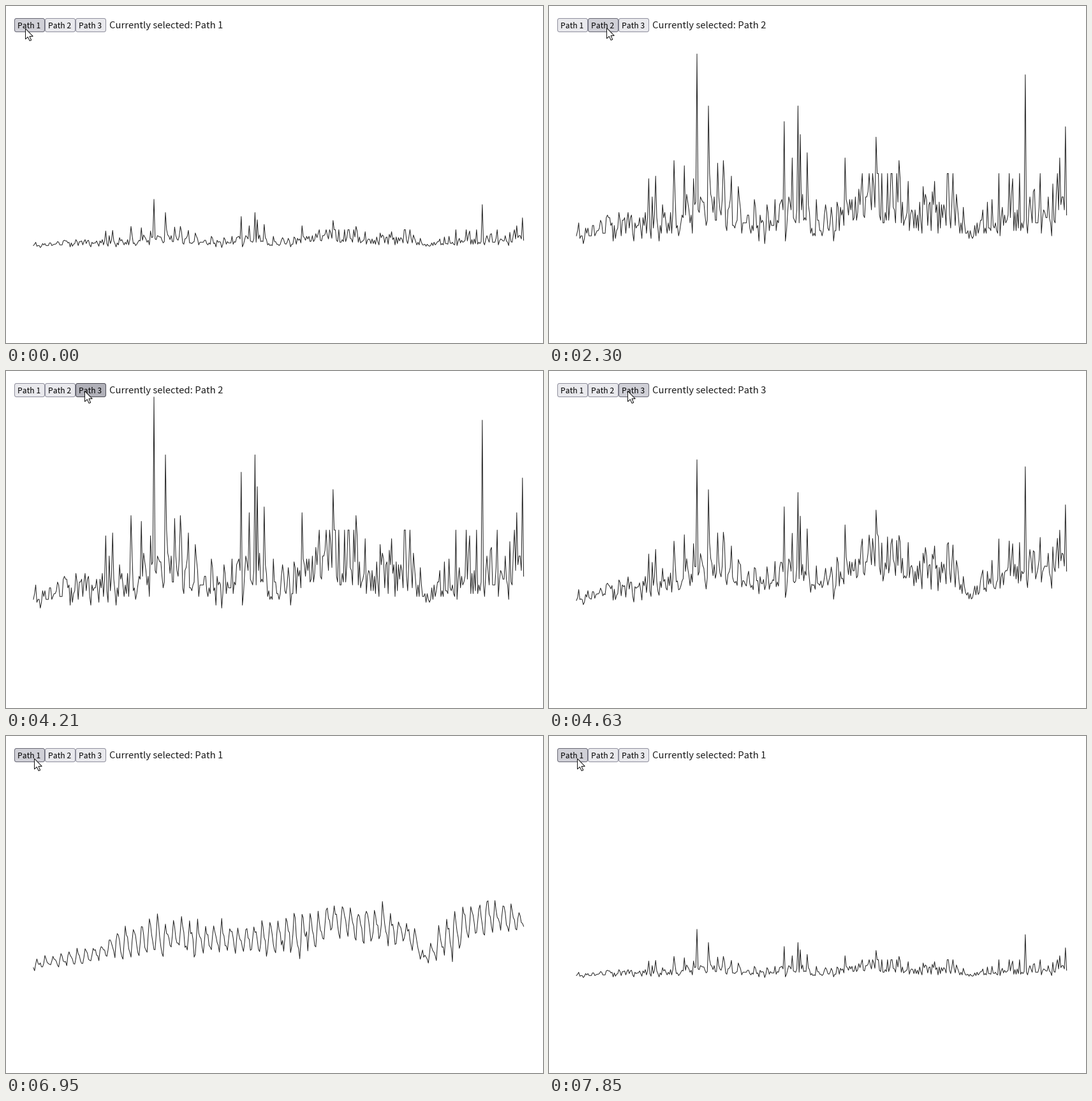
A matplotlib script for the animation above (8 s loop, 842 by 528 pixels).

```python
import numpy as np
import matplotlib.pyplot as plt
from matplotlib.animation import FuncAnimation
from matplotlib.patches import FancyBboxPatch, Polygon

W, H, DPI = 842, 528, 100
LOOP, TICK = 8000, 20
FONT = "Noto Sans CJK JP"
INK = "#222222"
PX = 72 / DPI

plt.rcParams["path.simplify"] = False
plt.rcParams["toolbar"] = "None"

# One sample per day
X0, DX, N = 43, 1.8, 428
FLOOR = 380.5
day = np.arange(N)
x = X0 + DX * day
rng = np.random.default_rng(12)


def curve(points):
    return np.interp(x, *zip(*points))


# Daily counts: skewed noise around a level, with a few tall spikes
LEVEL = [(43, 5), (85, 8), (150, 10), (240, 16), (300, 14), (315, 8), (390, 15),
         (420, 10), (505, 19), (555, 15), (642, 16), (658, 5), (700, 9), (715, 16),
         (812, 17)]
SPIKES = [(167, 28), (196, 34), (212, 32), (231.5, 75), (249.5, 55), (264, 33),
          (273.5, 34), (368.5, 49), (381, 35), (390, 55), (393.5, 44), (404.5, 37),
          (464, 35), (512.5, 43), (548, 34), (746.5, 67), (800, 35), (809, 47)]

counts = np.minimum(np.round(curve(LEVEL) * rng.gamma(5, 1 / 5, N)), 29)
for px, c in SPIKES:
    counts[round((px - X0) / DX)] = c

# Weekly wave between two bounds: slow fall, quick rise
TOP = [(43, 350), (90, 341), (150, 326), (185, 303), (221, 290), (275, 284),
       (310, 298), (400, 297), (450, 283), (530, 264), (596, 268), (640, 298),
       (655, 340), (691, 288), (719, 268), (768, 256), (812, 280)]
BOTTOM = [(43, 366), (80, 363), (128, 356), (181, 345), (347, 340), (484, 342),
          (510, 306), (548, 322), (635, 332), (655, 356), (698, 345), (723, 322),
          (762, 308), (812, 306)]

phase = (day - 129) % 7 / 7
swing = np.interp(phase, [0, 0.7, 1], [1, 0, 1]) + rng.normal(0, 0.1, N)
low = curve(BOTTOM)
waves = low + (curve(TOP) - low) * swing

SERIES = [FLOOR - 1.035 * counts, FLOOR - 4.53 * counts, waves]

# Timeline: (first, last, steps), (down, up, choice), (time, x, y)
BURSTS = [(0, 0, 1), (500, 1110, 7), (1600, 2600, 11), (3220, 3620, 5),
          (4120, 4830, 8), (4930, 5230, 4), (5830, 6350, 6), (6750, 7850, 12)]
STEPS = np.concatenate([np.linspace(*b) for b in BURSTS])
CLICKS = [(1600, 1620, 1), (4120, 4190, 2), (6750, 6850, 0)]
MORPH = 1000
MOUSE = [(400, 30, 36), (800, 104, 37), (900, 109, 37), (1110, 90, 35),
         (3120, 90, 35), (3220, 92, 35), (3620, 123, 32), (5730, 123, 32),
         (5930, 112, 35), (6040, 71, 40), (6350, 44, 36)]
ARROW = np.array([(0, 0), (0, 16.5), (3.8, 13), (6.6, 19), (9.2, 18),
                  (6.5, 12), (11.8, 12)])


def ease(u):
    u = min(max(u, 0), 1)
    return 4 * u ** 3 if u < 0.5 else 1 - 4 * (1 - u) ** 3


def mouse_at(t):
    mt, mx, my = zip(*MOUSE)
    return np.round([np.interp(t, mt, mx), np.interp(t, mt, my)])


# Stage
fig = plt.figure(figsize=(W / DPI, H / DPI), dpi=DPI, facecolor="white")
ax = fig.add_axes([0, 0, 1, 1])
ax.set(xlim=(0, W), ylim=(H, 0))
ax.axis("off")

IDLE = ("#e9e9ed", "#8f8f9d")
HOVER = ("#d0d0d7", "#676774")
ACTIVE = ("#b1b1b9", "#484851")


def label(px, py, s, size, color):
    return ax.text(px, py, s, family=FONT, size=size * PX, color=color,
                   ha="left", va="baseline", zorder=4)


buttons = []
for k in range(3):
    left = 13 + 48 * k
    box = FancyBboxPatch((left + 0.5, 19.5), 47, 21, lw=PX,
                         boxstyle="round,pad=0,rounding_size=3.2", zorder=3)
    buttons.append(ax.add_patch(box))
    label(left + 5.2, 35, f"Path {k + 1}", 12.2, "black")

status = label(161.5, 35, "", 14.85, "#1c1c1c")
line, = ax.plot(x, SERIES[0], color=INK, lw=PX, zorder=2)
pointer = ax.add_patch(Polygon(ARROW, closed=True, fc="white", ec="#111111",
                               lw=PX, joinstyle="miter", zorder=6))


def draw(i):
    now = i * TICK + TICK / 2
    t = STEPS[np.searchsorted(STEPS, now, side="right") - 1]

    chosen, y, pressed = 0, SERIES[0], False
    for down, up, choice in CLICKS:
        pressed |= down <= t < up
        if t >= up:
            e = ease((t - up) / MORPH)
            y = SERIES[chosen] * (1 - e) + SERIES[choice] * e
            chosen = choice
    line.set_ydata(y)
    status.set_text(f"Currently selected: Path {chosen + 1}")

    tip = mouse_at(t)
    pointer.set_xy(ARROW + tip + (0.5, -0.5))
    for k, b in enumerate(buttons):
        over = 0 <= tip[0] - 13 - 48 * k < 48
        fill, edge = (ACTIVE if pressed else HOVER) if over else IDLE
        b.set(facecolor=fill, edgecolor=edge)
    return [line, status, pointer, *buttons]


anim = FuncAnimation(fig, draw, frames=LOOP // TICK, interval=TICK,
                     repeat=True, repeat_delay=0, blit=False)
plt.show()
```
